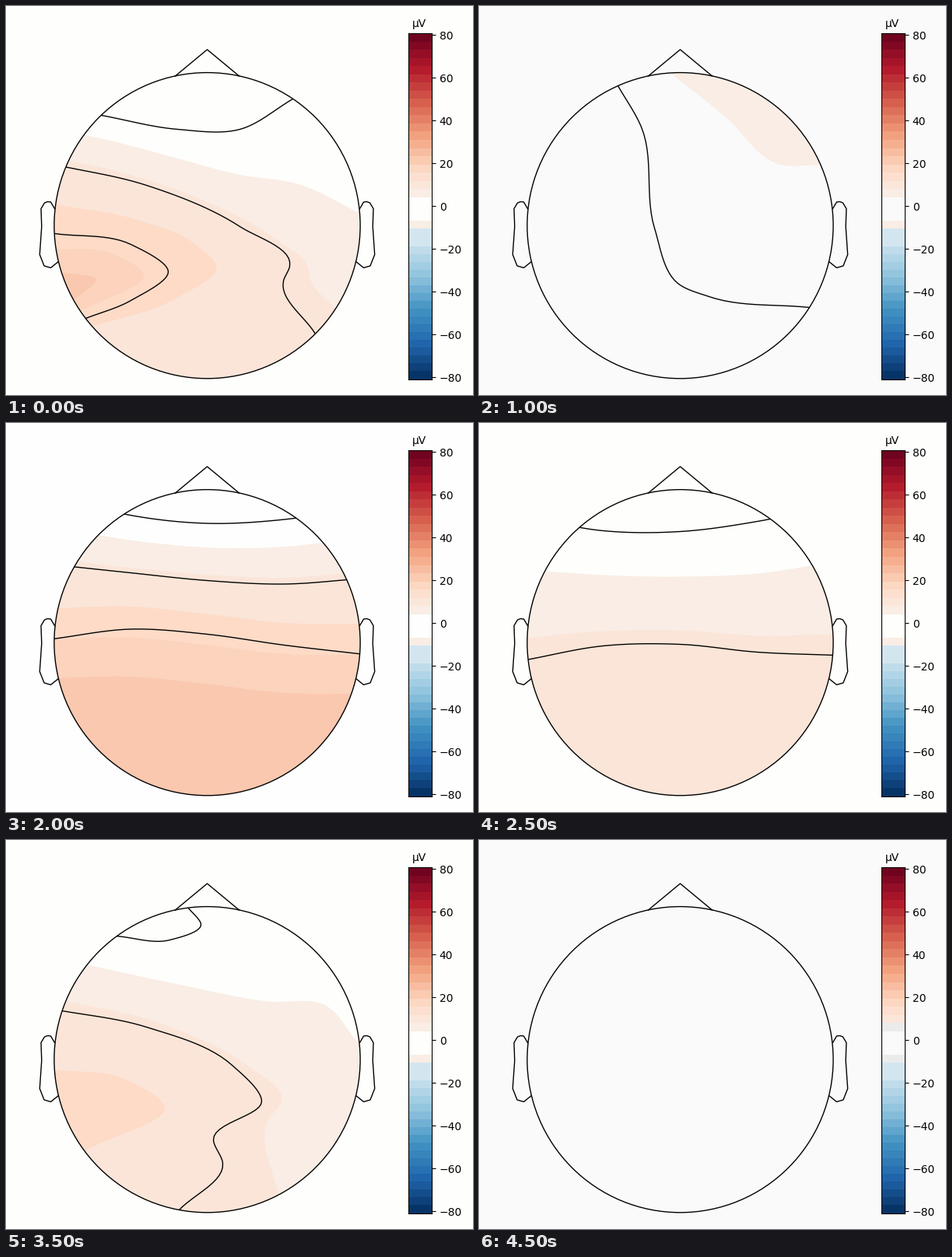
Write a matplotlib script that moves like this. It is 600x500 px and loops after 5 s.

```python
import numpy as np
import matplotlib.pyplot as plt
from matplotlib.animation import FuncAnimation
from matplotlib.patches import Circle, Polygon, Rectangle

W, H, DPI = 600, 500, 100
CX, CY, R = 258, 281.7, 196.6
VMAX = 80.9
LINE = 1.0
LEVELS = (6, 10.7, 16, 18.7, 21.5, 27, 31)
WARM, GREY, WHITE = "#fefefc", "#fafafa", "#fefefe"

plt.rcParams["font.family"] = "DejaVu Sans"
cmap = plt.get_cmap("RdBu_r")


def tint(v):
    return cmap((v / VMAX + 1) / 2)


def row(*ys):
    """Points across the whole head at evenly spaced x."""
    return np.c_[np.linspace(60, 456, len(ys)), ys]


def path(*xy):
    return np.reshape(xy, (-1, 2)).astype(float)


def smooth(p, n=14):
    """Cubic Hermite curve through the points, chord-length parameter."""
    t = np.r_[0, np.cumsum(np.hypot(*np.diff(p, axis=0).T))]
    m = np.gradient(p, t, axis=0)
    s = np.linspace(0, 1, n)[:, None]
    parts = []
    for i, d in enumerate(np.diff(t)):
        parts.append((2 * s**3 - 3 * s**2 + 1) * p[i]
                     + (s**3 - 2 * s**2 + s) * d * m[i]
                     + (3 * s**2 - 2 * s**3) * p[i + 1]
                     + (s**3 - s**2) * d * m[i + 1])
    return np.vstack(parts)


def close_round(curve):
    """Close a curve outside the head, clockwise from its end to its start."""
    a1, a0 = (np.arctan2(y - CY, x - CX) for x, y in (curve[-1], curve[0]))
    a = a1 + np.linspace(0, (a0 - a1) % (2 * np.pi), 60)
    rim = np.c_[CX + 1.4 * R * np.cos(a), CY + 1.4 * R * np.sin(a)]
    return np.vstack([curve, rim])


# Each map: paper colour, band edges from low to high, contour lines.
def left_rise():
    edges = [row(157, 174, 195, 216, 229, 267),
             path(60, 194, 150, 214, 250, 248, 350, 302, 388, 336, 390, 350,
                  421, 387),
             path(60, 254, 170, 275, 240, 304, 270, 335, 220, 374, 110, 412),
             path(62, 312, 130, 316, 176, 343, 90, 394),
             path(72, 342, 115, 351, 82, 381)]
    lines = [path(122, 140, 220, 158, 300, 158, 368, 119),
             path(60, 203, 180, 230, 300, 283, 364, 334, 356, 353, 397, 421),
             path(62, 292, 160, 306, 208, 341, 160, 378, 102, 401)]
    return WARM, edges, lines


def back_faint():
    return (WARM, [row(332, 302, 296, 303, 304)],
            [path(105, 158, 210, 155, 321, 96)])


def front_right():
    return (GREY, [path(437, 204, 385, 203, 315, 141, 246, 86)],
            [path(178, 102, 208, 155, 225, 285, 255, 356, 295, 373,
                  424, 387)])


def back_right():
    edges = [row(174, 181, 180, 170, 146), row(222, 221, 218, 213, 198),
             row(300, 281, 276, 278, 274),
             path(172, 460, 164, 411, 115, 397, 97, 380, 170, 339, 270, 329,
                  445, 341),
             path(395, 428, 330, 446, 270, 418, 320, 382, 425, 385)]
    lines = [row(140, 147, 147, 132, 104), row(232, 230, 229, 223, 209),
             row(355, 318, 310, 314, 321)]
    return WHITE, edges, lines


def back_mild():
    return (WARM,
            [row(188, 195, 197, 193, 178), row(276, 267, 266, 273, 271)],
            [row(120, 138, 139, 126, 105), row(304, 286, 284, 294, 298)])


def back_strong():
    edges = [row(92, 119, 139, 147, 147), row(127, 150, 171, 184, 183),
             row(175, 190, 214, 235, 241), row(211, 224, 246, 267, 285),
             row(228, 238, 258, 286, 314), row(283, 279, 283, 308, 361, 412),
             path(62, 332, 155, 313, 235, 328, 254, 349, 200, 378, 105, 400)]
    lines = [row(45, 89, 110, 115, 112), row(131, 154, 175, 190, 190),
             row(199, 211, 232, 256, 272),
             row(271, 270, 278, 301, 337, 378)]
    return WHITE, edges, lines


def back_even():
    """Halfway between the right-hand and the strong map."""
    _, e1, l1 = back_right()
    _, e2, l2 = back_strong()
    edges = [(a + b) / 2 for a, b in zip(e1[:3], e2)]
    edges += [edges[2] + (0, 40), edges[2] + (0, 90)]
    return WHITE, edges, [(a + b) / 2 for a, b in zip(l1, l2)]


def left_fall():
    edges = [path(104, 160, 230, 187, 335, 207, 410, 212, 453, 262),
             path(60, 203, 200, 236, 310, 290, 354, 333, 335, 362, 350, 460),
             path(62, 295, 150, 306, 203, 341, 105, 397)]
    lines = [path(141, 123, 210, 128, 250, 108, 233, 86),
             path(60, 217, 180, 240, 290, 289, 328, 335, 266, 385, 278, 415,
                  222, 475)]
    return WARM, edges, lines


def left_faint():
    return (WARM, [row(240, 253, 288, 335, 356)],
            [path(110, 153, 240, 140, 250, 86)])


def flat():
    return GREY, [], []


maps = [f() for f in (left_rise, back_faint, front_right, back_right,
                      back_even, back_mild, back_strong, left_fall,
                      left_faint, flat)]

fig = plt.figure(figsize=(W / DPI, H / DPI), dpi=DPI)
ax = fig.add_axes([0, 0, 1, 1])
ax.set(xlim=(-0.5, W - 0.5), ylim=(H - 0.5, -0.5))
ax.axis("off")
paper = ax.add_patch(Rectangle((-1, -1), W + 2, H + 2, lw=0, zorder=0))

# Head outline
head = ax.add_patch(Circle((CX, CY), R, fc="none", ec="k", lw=LINE, zorder=5))
ax.plot([217, CX, 299], [89.5, 55.5, 89.5], "k", lw=LINE, zorder=5)
ear = path(62, 260, 57, 251.5, 53, 251, 49, 252.5, 44.5, 260, 45.3, 283,
           42.8, 319, 48.5, 333.5, 57, 336, 66.3, 328.5)
for side in (ear[:, 0], 2 * CX - ear[:, 0]):
    ax.plot(side, ear[:, 1], "k", lw=LINE, zorder=5)

# Colour bar
bar = fig.add_axes([517 / W, 1 - 479.5 / H, 30 / W, 444.5 / H])
bar.set(xlim=(0, 1), ylim=(-VMAX, VMAX), xticks=[],
        yticks=range(-80, 81, 20))
bar.patch.set_visible(False)
bar.yaxis.tick_right()
bar.tick_params(labelsize=10)


def band(lo, hi, color):
    return bar.add_patch(Rectangle((0, lo), 1, hi - lo, fc=color, lw=0,
                                   antialiased=False))


for steps in (np.linspace(-VMAX, -19, 18), np.linspace(8, VMAX, 20)):
    for lo, hi in zip(steps, steps[1:]):
        band(lo, hi, tint((lo + hi) / 2))
band(-19, -10.5, "#d3e6f0")
pale = [band(-10.5, -7, tint(6)), band(4.2, 8, tint(6))]
ax.text(530.8, 26, "µV", ha="center", va="baseline", fontsize=10)

shown = []


def draw(i):
    while shown:
        shown.pop().remove()
    color, edges, lines = maps[i]
    paper.set_facecolor(color)
    for p in pale:
        p.set_facecolor(tint(6) if edges else "#ebebeb")
    for v, pts in zip(LEVELS, edges):
        area = Polygon(close_round(smooth(pts)), fc=tint(v), lw=0, zorder=2)
        shown.append(ax.add_patch(area))
    for pts in lines:
        shown.extend(ax.plot(*smooth(pts).T, "k", lw=LINE, zorder=3))
    for art in shown:
        art.set_clip_path(head)
    return shown


anim = FuncAnimation(fig, draw, frames=len(maps), interval=500,
                     init_func=lambda: draw(0), repeat=True, repeat_delay=0)
plt.show()
```
